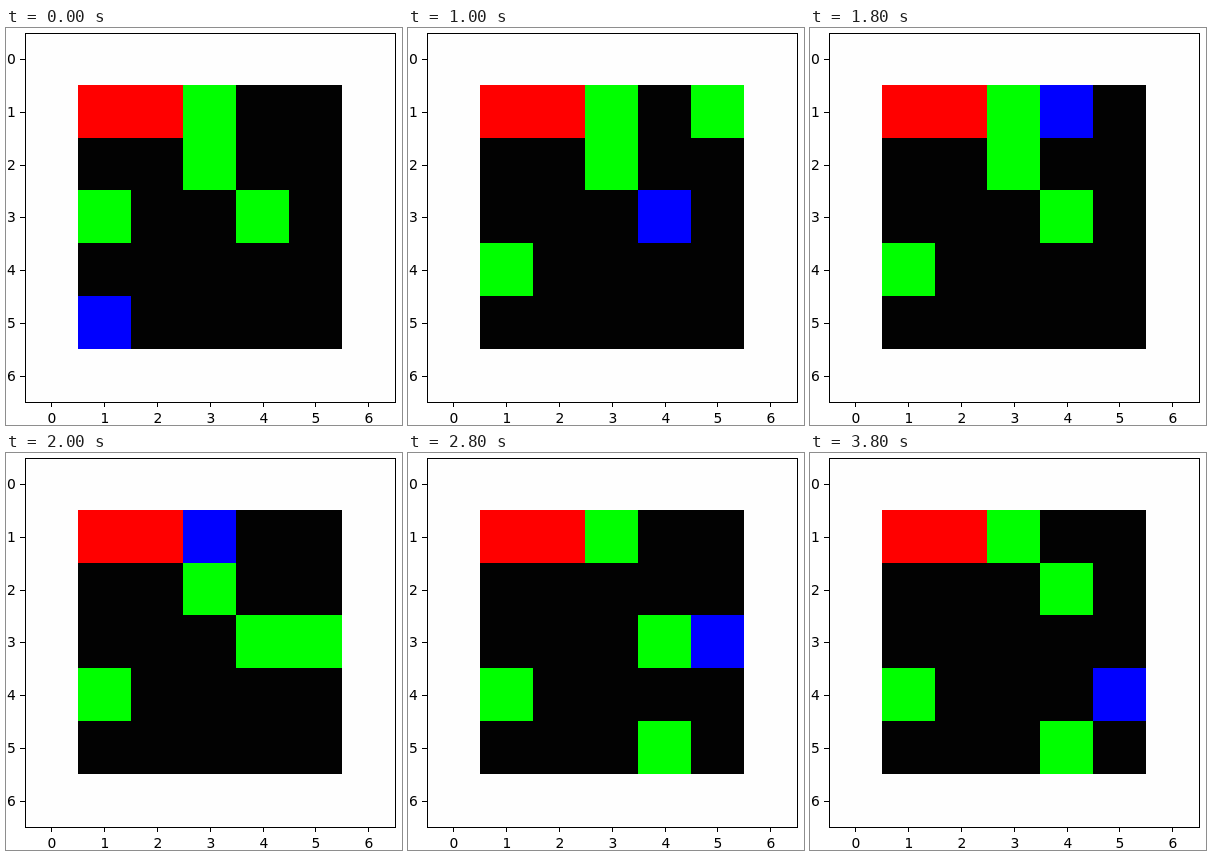
An HTML page for the animation above (4000 ms loop, 396 px wide and 397 px high).

```html
<!DOCTYPE html>
<html lang="en">
<head>
<meta charset="utf-8">
<title>Grid world</title>
<style>
  html, body { margin: 0; width: 100%; height: 100%; overflow: hidden; background: #fff; }
  svg { display: block; }
  text { font: 13.89px "DejaVu Sans", sans-serif; }
  .cells { shape-rendering: crispEdges; }
  .cells rect { animation: 4s step-end infinite; }
  .food { fill: #0f0; }
  .agent { fill: #00f; }

  /* x and y are grid columns and rows; one step is 5% */
  .cells .agent { animation-name: walk; }
  .cells .a { animation-name: food-a; }
  .cells .b { animation-name: food-b; }
  .cells .c { animation-name: food-c; }
  .cells .d { animation-name: food-d; }

  @keyframes walk {
    0%  { x: 1px; y: 5px; }
    5%  { x: 1px; y: 4px; }
    10% { x: 1px; y: 3px; }
    15% { x: 2px; y: 3px; }
    20% { x: 3px; y: 3px; }
    25% { x: 4px; y: 3px; }
    30% { x: 4px; y: 2px; }
    35% { x: 4px; y: 1px; }
    40% { x: 5px; y: 1px; }
    45% { x: 4px; y: 1px; }
    50% { x: 3px; y: 1px; }
    55% { x: 3px; y: 2px; }
    60% { x: 4px; y: 2px; }
    65% { x: 5px; y: 2px; }
    70% { x: 5px; y: 3px; }
    75% { x: 4px; y: 3px; }
    80%, 90% { x: 4px; y: 4px; }
    85%, 95%, 100% { x: 5px; y: 4px; }
  }

  /* each piece of food reappears elsewhere once the agent reaches it */
  @keyframes food-a {
    0%  { x: 3px; y: 1px; }
    50% { x: 5px; y: 3px; }
    70%, 100% { x: 4px; y: 5px; }
  }
  @keyframes food-b {
    0%  { x: 3px; y: 2px; }
    55% { x: 5px; y: 2px; }
    65%, 100% { x: 3px; y: 1px; }
  }
  @keyframes food-c {
    0%  { x: 1px; y: 3px; }
    10% { x: 5px; y: 1px; }
    40% { x: 4px; y: 3px; }
    75% { x: 4px; y: 4px; }
    80%, 100% { x: 4px; y: 2px; }
  }
  @keyframes food-d {
    0%  { x: 4px; y: 3px; }
    25%, 100% { x: 1px; y: 4px; }
  }
</style>
</head>
<body>
<svg width="396" height="397" viewBox="0 0 396 397">
  <rect x="19" y="5" width="370" height="369" fill="#fefefe"/>
  <g class="cells" transform="translate(19 4) scale(52.8)">
    <rect x="1" y="1" width="5" height="5" fill="#020202"/>
    <rect x="1" y="1" width="2" height="1" fill="#f00"/>
    <rect class="food a" x="3" y="1" width="1" height="1"/>
    <rect class="food b" x="3" y="2" width="1" height="1"/>
    <rect class="food c" x="1" y="3" width="1" height="1"/>
    <rect class="food d" x="4" y="3" width="1" height="1"/>
    <rect class="agent" x="1" y="5" width="1" height="1"/>
  </g>
  <rect x="19.5" y="5.5" width="370" height="369" fill="none" stroke="#000"/>
  <g id="axes"></g>
</svg>
<script>
  const axes = document.getElementById("axes");

  function add(tag, attrs, content = "") {
    const node = document.createElementNS("http://www.w3.org/2000/svg", tag);
    for (const key in attrs) node.setAttribute(key, attrs[key]);
    node.textContent = content;
    axes.append(node);
  }

  for (let i = 0; i < 7; i++) {
    const x = Math.round(45.4 + 52.8 * i) + 0.5;
    const y = Math.round(30.95 + 52.8 * i) + 0.5;
    add("path", { d: `M${x} 375v4M19 ${y}h-5`, stroke: "#000" });
    add("text", { x: x + 0.5, y: 395, "text-anchor": "middle" }, i);
    add("text", { x: 9.8, y: y + 4.5, "text-anchor": "end" }, i);
  }
</script>
</body>
</html>
```
